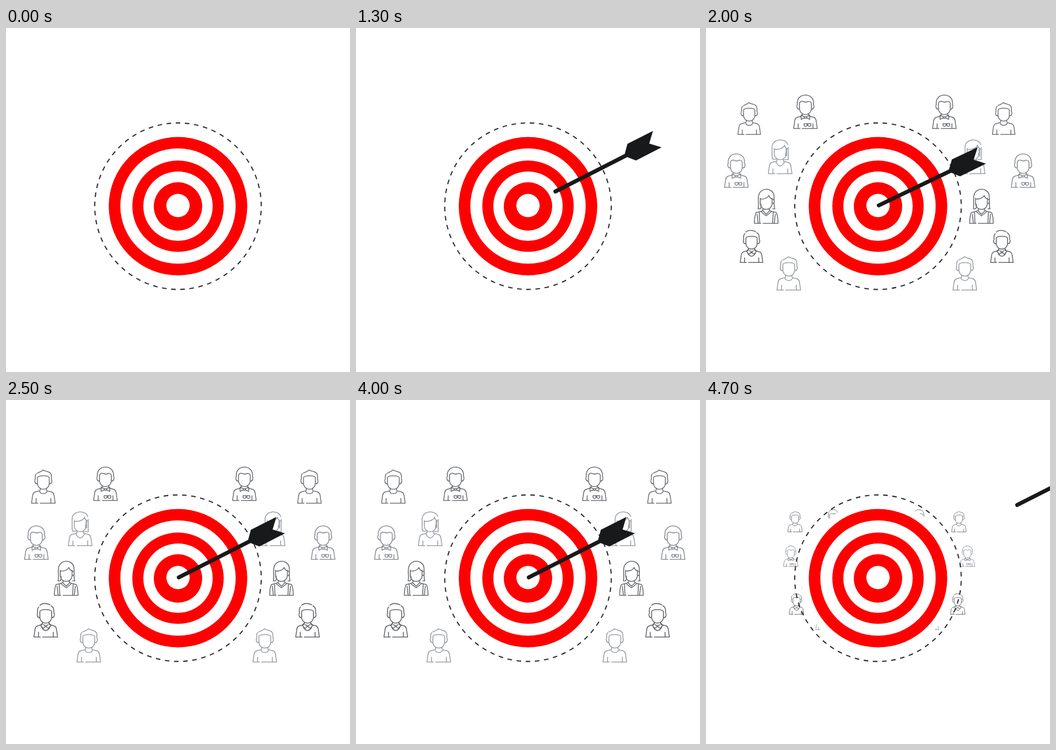
An HTML page for the animation above (4800 ms loop, 640 by 640 pixels).

```html
<!DOCTYPE html>
<html lang="en">
<head>
<meta charset="utf-8">
<title>On target</title>
<style>
  html, body { margin: 0; width: 100%; height: 100%; overflow: hidden; background: #fff; }
  svg { display: block; width: 100vw; height: 100vh; }
  #people { fill: none; stroke-width: 1.6; stroke-linecap: round; stroke-linejoin: round; }
</style>
</head>
<body>
<svg viewBox="0 0 640 640">
  <g id="people"></g>
  <circle cx="320" cy="331.5" r="143" fill="#fff"/>
  <circle id="dashes" cx="320" cy="331.5" r="154.9" pathLength="114" stroke-dasharray="1 1"
    stroke-dashoffset=".5" fill="none" stroke="#2b2b2d" stroke-width="2.1"/>
  <g id="rings"></g>
  <g id="arrow" fill="#18191b">
    <path d="M321.5 330L460 259.500" stroke="#18191b" stroke-width="7.4" stroke-linecap="round"/>
    <path d="M449.5 264L455.5 241.500L503 217.500L496 241L519 248L471.500 272.500Z"/>
  </g>
</svg>
<script>
const LOOP = 4800, STEP = 100, CX = 320, CY = 331;
const $ = id => document.getElementById(id);

function add(parent, tag, attrs) {
  const el = document.createElementNS('http://www.w3.org/2000/svg', tag);
  for (const name in attrs) el.setAttribute(name, attrs[name]);
  return parent.appendChild(el);
}

[[331.5, 128.8], [331.3, 107.3], [331.5, 85], [331.4, 64.5], [332, 45], [330.3, 21.7]].forEach(([cy, r], i) =>
  add($('rings'), 'circle', { cx: CX, cy, r, fill: i % 2 ? '#fff' : '#f00' }));

// Line art in a box of 46 by 64
const face = 'M12 16V25C12 41 34 41 34 25V16';
const ears = 'M8 18C6 21 7 27 12 27M38 18C40 21 39 27 34 27';
const neck = 'M17 35V39M29 35V39';
const body = 'M16 40C9 42 4 41 3 49L1 63H13M17 63H45L43 49C42 41 37 42 30 40M9.500 54V63M37 54V63';
const man = face + ears + neck + body;
const figures = {
  boy: man + 'M8 18V13C8 11 9 9 10 8M12 7C16 4 19 5 22.500 1C26 5 38 2 38 13V18' +
    'M12 16C12 13 16 12 23 12S34 13 34 16M16 40C17 47 29 47 30 40',
  bow: man + 'M8 18C5 -5 41 -5 38 18M12 16C14 11 18 12 20 13C22 14 25 14 27 13C30 12 33 13 34 16' +
    'M21 41L15 38V46L21 43ZM25 41L31 38V46L25 43ZM21 41H25V44H21Z' +
    'M20.500 54H26V57C25 60 21.500 60 20.500 57ZM27.500 54H33V57C32 60 28.500 60 27.500 57Z',
  vest: man + 'M8 18C7 13 8 9 10 7M12 4C17 -1 26 1 31 3M33 5C38 7 38 12 38 18' +
    'M12 16C12 13 16 12 23 12S34 13 34 16' +
    'M17 37L13 41L18 47L23 43L28 47L33 41L29 37M19 40L23 43L27 40M15 43C16 48 19 50 23 51C27 50 30 48 31 43',
  bob: face + body + 'M17 35V40M29 35V40M15 36H9C8 33 8 31 8 28V14C8 -4 35 -3 37 9M38 14V37H31' +
    'M12 18C21 18 29 16 31 10C32 14 34 16 37 17M35 16V30M33 25V31M15 41C17 46 20 48 23 49C26 48 29 46 31 41',
  long: face + neck + 'M8 36C10 27 7 18 9 11C12 -4 33 -4 37 9C39 18 36 27 39 36H35' +
    'M8 36H12C14 33 14 30 13 27M12 18C20 18 26 15 28 11C29 15 32 17 35 18M35 18C39 18 39 27 34 26' +
    'M15 40L4 43C2 48 1 55 1 63H13M17 63H45C45 55 44 48 42 43L31 40' +
    'M6 46L8 63M10 42L11 63M40 46L38 63M36 42L35 63M13 41L23 49L33 41M16 39L23 46L30 39'
};

// figure, left x, right x, y, colour, start of the entrance
const crowd = [
  ['boy', 69.5, 564.5, 161, '#6f7277', 1672],
  ['bow', 185, 443.5, 156, '#6c6f75', 1414],
  ['bob', 138, 497, 240, '#9b9fa7', 1414],
  ['bow', 56.5, 590, 265.5, '#8a8e96', 1543],
  ['long', 112, 512.5, 332.5, '#686b70', 1414],
  ['vest', 74, 561, 410, '#606267', 1672],
  ['boy', 154, 481.5, 456.5, '#999da4', 1414]
].flatMap(([kind, left, right, y, stroke, start]) => [left, right].map(x => ({
  x, y, start, el: add($('people'), 'path', { d: figures[kind], stroke })
})));

const clamp = v => Math.max(0, Math.min(1, v));
const GROW = 459, LEAVE = 4387, HIT = 1345, WOBBLE = 900, PULL = 4063;

function growth(t, start) {
  return t < LEAVE
    ? 1 - (1 - clamp((t - start) / GROW)) ** 2.5
    : 1 - clamp((t - LEAVE) / GROW) ** 2.5;
}

function draw(t) {
  $('dashes').setAttribute('transform', `rotate(${360 * t / LOOP - 90} 320 331.5)`);

  for (const { x, y, start, el } of crowd) {
    const k = growth(t, start);
    el.setAttribute('visibility', k > 0 ? 'visible' : 'hidden');
    el.setAttribute('transform',
      `translate(${CX + (x - CX) * k} ${CY + (y - CY) * k}) scale(${k}) translate(-23 -32)`);
  }

  const shift = t < HIT ? 1.1 * (HIT - t)
    : t > PULL ? 257.5 * ((t - PULL) / 637) ** 2 : 0;
  const since = t - HIT;
  const tilt = since > 0 && since < WOBBLE
    ? 5.1 * (1 - since / WOBBLE) * Math.sin(2 * Math.PI * since / 284) : 0;
  $('arrow').setAttribute('transform',
    `translate(${shift} ${-0.523 * shift}) rotate(${tilt} 321.5 330)`);
}

// The motion advances at ten poses per second
const begin = performance.now();
function tick() {
  const t = Math.max(0, performance.now() - begin) % LOOP;
  draw(Math.floor(t / STEP) * STEP);
  requestAnimationFrame(tick);
}
tick();
</script>
</body>
</html>
```
